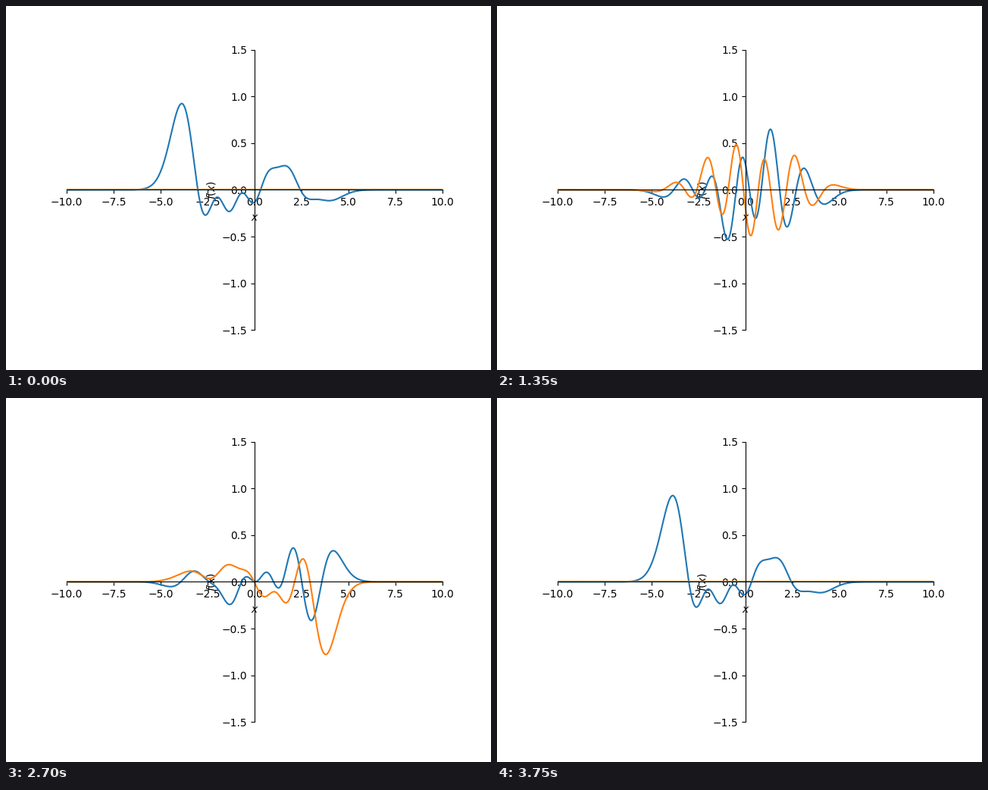
A matplotlib script that plays this animation: 640x480 px, repeating every 3900 ms.

```python
import numpy as np
import matplotlib.pyplot as plt
from matplotlib.animation import FuncAnimation

STEPS = 26
LEVELS = 12
ENERGY = np.arange(LEVELS) + 0.5
POSE = 9

# Turning points of both parts of the wave at the pose step
REAL_TURNS = [(-4.4, -.078), (-3.27, .117), (-1.79, .147), (-.95, -.53),
              (-.16, .348), (.53, -.305), (1.33, .648), (2.22, -.395),
              (3.1, .232), (4.22, -.153)]
IMAG_TURNS = [(-3.67, .08), (-2.87, -.08), (-2.03, .345), (-1.22, -.262),
              (-.49, .485), (.27, -.49), (1.01, .328), (1.76, -.428),
              (2.6, .368), (3.56, -.165), (4.67, .053)]


def basis(x):
    """Harmonic oscillator eigenfunctions, one column per level."""
    cols = [np.pi ** -0.25 * np.exp(-x ** 2 / 2)]
    cols.append(np.sqrt(2) * x * cols[0])
    for n in range(2, LEVELS):
        cols.append(np.sqrt(2 / n) * x * cols[-1]
                    - np.sqrt((n - 1) / n) * cols[-2])
    return np.stack(cols, axis=1)


def phases(step):
    # two classical periods per loop
    return np.exp(-1j * ENERGY * 4 * np.pi * step / (STEPS - 1))


def fit_weights(slope_weight=0.08, h=1e-4):
    """Least-squares level weights from heights and zero slopes."""
    rows, goals = [], []
    turn = phases(POSE)
    for part, points in ((turn.real, REAL_TURNS), (turn.imag, IMAG_TURNS)):
        x, height = np.array(points).T
        slope = (basis(x + h) - basis(x - h)) / (2 * h)
        rows += [basis(x) * part, slope_weight * slope * part]
        goals += [height, np.zeros_like(x)]
    return np.linalg.lstsq(np.vstack(rows), np.concatenate(goals),
                           rcond=None)[0]


x = np.linspace(-10, 10, 1000)
modes = basis(x) * fit_weights()

fig, ax = plt.subplots(figsize=(6.4, 4.8), dpi=100)
ax.set(xlim=(-10, 10), ylim=(-1.5, 1.5), xlabel="$x$", ylabel="$f(x)$")
for side in ("left", "bottom"):
    ax.spines[side].set_position("center")
for side in ("right", "top"):
    ax.spines[side].set_visible(False)
real_line, = ax.plot([], [], color="C0")
imag_line, = ax.plot([], [], color="C1")


def update(step):
    wave = modes @ phases(step)
    real_line.set_data(x, wave.real)
    imag_line.set_data(x, wave.imag)
    return real_line, imag_line


anim = FuncAnimation(fig, update, frames=STEPS, interval=150, repeat=True)
plt.show()
```
